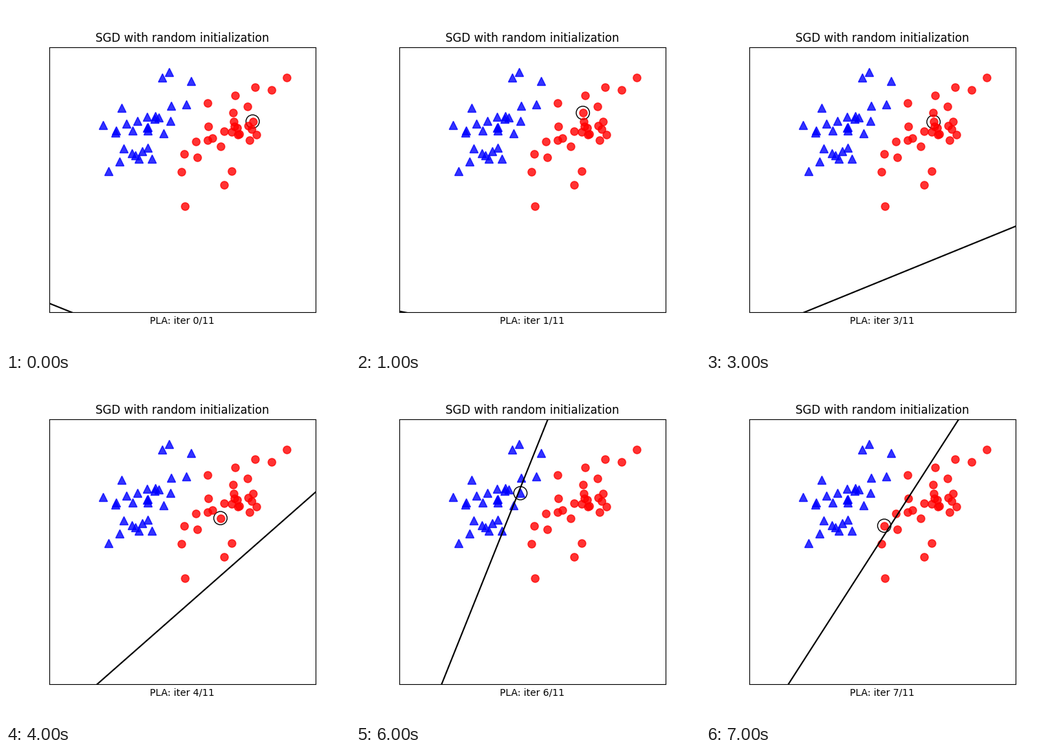
Animation of 500 by 500 pixels, one loop 8000 ms. Source, as a matplotlib script:

```python
import numpy as np
import matplotlib.pyplot as plt
from matplotlib.animation import FuncAnimation

STEPS = 8
LAST_ITER = 11
COUNT = 30  # samples per class

# Rows scale two independent normals into covariance [[.3, .2], [.2, .3]].
SPREAD = np.array([[-0.5, -0.5], [-np.sqrt(0.05), np.sqrt(0.05)]])

rng = np.random.RandomState(2)


def cloud(mean):
    return mean + rng.randn(COUNT, 2) @ SPREAD


blue, red = cloud((2, 2)), cloud((4, 2))
samples = np.vstack([blue, red])
labels = np.repeat([1, -1], COUNT)

# Misclassified samples in the order they are visited.
picks = [56, 35, 33, 44, 48, 46, 4, 43]

# Perceptron rule: each pick shifts the weights (bias, x, y).
weights = [np.array([35.74, 8.044, 19.88])]
for i in picks:
    weights.append(weights[-1] + labels[i] * np.array([1, *samples[i]]))

fig, ax = plt.subplots(figsize=(5, 5), dpi=100)
ax.set_title("SGD with random initialization")
ax.plot(*blue.T, "b^", markersize=8, alpha=0.8)
ax.plot(*red.T, "ro", markersize=8, alpha=0.8)
boundary, = ax.plot([], [], "k")
ring = plt.Circle((0, 0), 0.15, color="k", fill=False)
ax.add_artist(ring)
ax.axis([0, 6, -2, 4])
ax.set_xticks([])
ax.set_yticks([])


def update(step):
    bias, wx, wy = weights[step]
    x = np.array([-100, 100])
    boundary.set_data(x, -(bias + wx * x) / wy)
    ring.center = tuple(samples[picks[step]])
    ax.set_xlabel(f"PLA: iter {step}/{LAST_ITER}")
    return boundary, ring


anim = FuncAnimation(fig, update, frames=STEPS, interval=1000, repeat=True)
plt.show()
```
